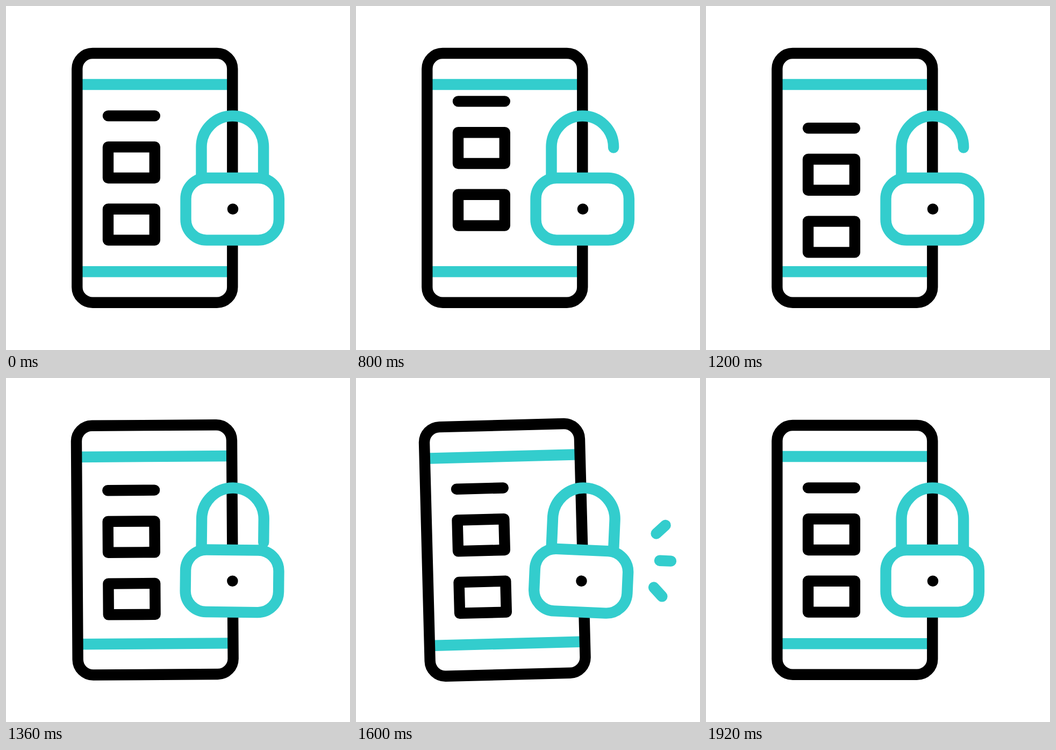
An HTML page that plays this animation: 640 px wide and 640 px high, repeating every 2480 ms.

```html
<!DOCTYPE html>
<html lang="en">
<head>
<meta charset="utf-8">
<title>Phone lock</title>
<style>
  html, body { margin: 0; width: 100%; height: 100%; overflow: hidden; background: #fff; }
  svg { display: block; width: 100vw; height: 100vh; }
  .line { fill: none; stroke: #000; stroke-width: 20.4; stroke-linecap: round; stroke-linejoin: round; }
  .teal { stroke: #33cdcd; }
</style>
</head>
<body>
<svg viewBox="0 0 640 640">
  <g id="phone">
    <path class="line teal" d="M134 146H420M134 494.3H420"/>
    <rect class="line" x="132.3" y="88" width="289" height="463.8" rx="28.9"/>
    <g id="content" class="line">
      <path d="M190 204.4H276.8"/>
      <rect x="190" y="262.2" width="86.8" height="57.8"/>
      <rect x="190" y="377.8" width="86.8" height="57.8"/>
    </g>
  </g>
  <g id="lock">
    <path id="shackle" class="line teal"/>
    <rect class="line teal" style="fill:#fff" x="334.5" y="320" width="173.4" height="115.6" rx="38.7"/>
    <circle cx="422" cy="377.7" r="10.3"/>
    <g id="sparks"></g>
  </g>
</svg>
<script>
  const LOOP = 2480, STEP = 40;
  const byId = id => document.getElementById(id);
  const linear = p => p;
  const smooth = p => p * p * (3 - 2 * p);

  // Tracks are lists of [time, value, easing into this key].
  const tracks = {
    scroll: [[480, 0], [800, -27, smooth], [1120, 27, smooth], [1440, 0, smooth]],
    phoneTurn: [[1280, 0], [1600, -1.5, linear], [1920, 0, linear]],
    lockTurn: [[480, 0], [640, -2.5, smooth], [800, 0, smooth],
               [1280, 0, linear], [1600, 2.5, linear], [1920, 0, linear]],
    legEnd: [[480, 320], [760, 263.5, smooth], [1200, 263.5, linear], [1440, 320, smooth]],
    sparkHead: [[1360, 0], [1600, 1, linear]],
    sparkTail: [[1360, 0], [1720, 1, linear]]
  };

  function valueAt(track, t) {
    if (t <= track[0][0]) return track[0][1];
    for (let i = 1; i < track.length; i++) {
      const [t0, a] = track[i - 1], [t1, b, ease] = track[i];
      if (t < t1) return a + (b - a) * ease((t - t0) / (t1 - t0));
    }
    return track[track.length - 1][1];
  }

  // Each ray: start x, start y, travel x, travel y.
  const rays = [[524.5, 316, 49, -48.7], [523.7, 333.4, 63, 0], [525, 351.5, 48, 48.3]].map(ray => {
    const el = document.createElementNS("http://www.w3.org/2000/svg", "path");
    el.setAttribute("class", "line teal");
    byId("sparks").append(el);
    return { el, ray };
  });

  function draw(t) {
    const v = {};
    for (const name in tracks) v[name] = valueAt(tracks[name], t);
    byId("content").setAttribute("transform", `translate(0 ${v.scroll})`);
    byId("phone").setAttribute("transform", `rotate(${v.phoneTurn} 276.8 320)`);
    byId("lock").setAttribute("transform", `rotate(${v.lockTurn} 421.3 320)`);
    byId("shackle").setAttribute("d", `M363.5 320V262.3A57.8 57.8 0 0 1 479.1 262.3V${v.legEnd}`);

    const visible = v.sparkHead - v.sparkTail > 0.001;
    byId("sparks").setAttribute("visibility", visible ? "visible" : "hidden");
    for (const { el, ray: [x, y, dx, dy] } of rays) {
      const at = p => `${x + dx * p} ${y + dy * p}`;
      el.setAttribute("d", `M${at(v.sparkTail)}L${at(v.sparkHead)}`);
    }
  }

  const start = performance.now();
  function tick() {
    const t = (performance.now() - start) % LOOP;
    draw(Math.floor(t / STEP) * STEP);
    requestAnimationFrame(tick);
  }
  tick();
</script>
</body>
</html>
```
